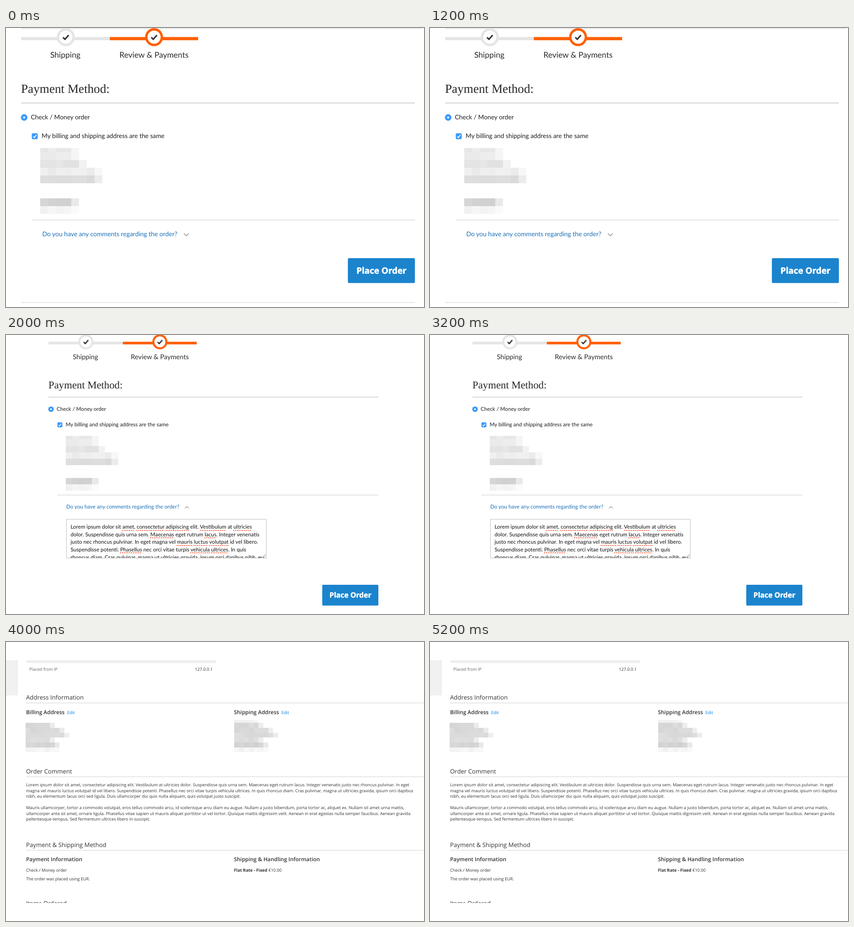
Write an HTML page that moves like this. It is 916 px wide and 611 px high and loops after 6000 ms.

```html
<!DOCTYPE html>
<html lang="en">
<head>
<meta charset="utf-8">
<title>Order comment</title>
<style>
  html, body { margin: 0; width: 100%; height: 100%; overflow: hidden; background: #fff; }
  svg { position: absolute; left: 0; top: 0; text-rendering: geometricPrecision; }
  #form { font: 13.8px Lato, sans-serif; fill: #1c1c1c; }
  #form .step { font-size: 17.5px; text-anchor: middle; fill: #2b2b2b; }
  #form .title { font: 27.2px "Liberation Serif", serif; fill: #262626; }
  #form .question { font-size: 13.95px; fill: #1a70b8; }
  #form .button { font: 700 18.9px "Open Sans", sans-serif; fill: #fff; stroke: #fff; stroke-width: .6; text-anchor: middle; }
  .mark { fill: none; stroke-linejoin: round; }
  #comment {
    position: absolute; left: 131.5px; top: 403px; width: 439px; height: 86px;
    box-sizing: border-box; padding: 8px 9px; border: 1px solid #bdbdbd; overflow: hidden;
    font: 11.72px/16.65px Lato, sans-serif; color: #111; white-space: pre;
    text-rendering: geometricPrecision;
  }
  #comment u { text-decoration: underline dotted #f4502a 2px; text-underline-offset: 3px; text-decoration-skip-ink: none; }
  #comment svg { left: auto; top: auto; right: 0; bottom: 0; }
  #order { font: 9.24px "Open Sans", sans-serif; fill: #333; }
  #order .head { font-size: 13.2px; }
  #order .sub { font-size: 11.9px; font-weight: 600; }
  #order .link { font-size: 9.5px; fill: #007bdb; }
</style>
</head>
<body>
<svg width="916" height="611" viewBox="0 0 916 611">
  <defs>
    <linearGradient id="shade" x2="0" y2="1">
      <stop stop-color="#dedede"/><stop offset="1" stop-color="#fff"/>
    </linearGradient>
    <clipPath id="page"><rect width="911" height="611"/></clipPath>
    <clipPath id="fold"><rect width="916" height="571.5"/></clipPath>
  </defs>

  <g id="checkout" clip-path="url(#page)">
    <g id="form">
      <rect x="33" width="893" height="3" fill="url(#shade)"/>
      <path d="M33 23.2H227.5" stroke="#e5e5e5" stroke-width="7"/>
      <path d="M227.5 23.2H421" stroke="#ff5f05" stroke-width="7"/>
      <g id="steps"></g>
      <text class="step" x="130" y="65">Shipping</text>
      <text class="step" x="324.3" y="65">Review &amp; Payments</text>
      <text class="title" x="33" y="142">Payment Method:</text>
      <path d="M33 164.4H896" stroke="#ccc" stroke-width="1.8"/>
      <circle cx="39.8" cy="196" r="7.2" fill="#3b99fc"/>
      <circle cx="39.8" cy="196" r="2.2" fill="#fff"/>
      <text x="54.5" y="200">Check / Money order</text>
      <rect x="56.5" y="230.5" width="13" height="13" rx="3" fill="#3b99fc"/>
      <path class="mark" d="M59.7 237.4l2.6 2.8 4.3-6.4" stroke="#fff" stroke-width="1.8"/>
      <text x="78" y="241.3">My billing and shipping address are the same</text>
      <g id="blur"></g>
      <path d="M56.5 420.5H896" stroke="#ccc" stroke-width="1.2"/>
      <text class="question" x="79.5" y="455.8">Do you have any comments regarding the order?</text>
      <path id="chevron" class="mark" d="M390 450l5.2 5.2 5.2-5.2" stroke="#888" stroke-width="1.3"/>
      <g id="footer">
        <rect x="749.2" y="504" width="146.8" height="54.5" rx="2.5" fill="#1b84cd"/>
        <text class="button" x="822.8" y="537.7">Place Order</text>
        <path d="M33 601.2H896" stroke="#ddd" stroke-width="1.4"/>
      </g>
    </g>
  </g>

  <g id="order">
    <path d="M0 40H25.5V117H0z" fill="#f1f1f1"/>
    <path d="M25 40V117" stroke="#e4e4e4"/>
    <path d="M44.5 40H460V46H44.5z" fill="#efefef"/>
    <text x="51" y="62.5" fill="#666">Placed from IP</text>
    <text x="414" y="62.5">127.0.0.1</text>
    <path d="M44 133.5H915M44 295H915M44 456H915" stroke="#d0d0d0"/>
    <text class="head" x="44" y="126.2">Address Information</text>
    <text class="sub" x="44" y="157.6">Billing Address</text>
    <text class="link" x="134" y="157.6">Edit</text>
    <text class="sub" x="499.5" y="157.6">Shipping Address</text>
    <text class="link" x="603.5" y="157.6">Edit</text>
    <g id="addresses"></g>
    <text class="head" x="44" y="287.8">Order Comment</text>
    <g id="paragraphs"></g>
    <text class="head" x="44" y="448.6">Payment &amp; Shipping Method</text>
    <text class="sub" x="44" y="479.8">Payment Information</text>
    <text x="44" y="502.8">Check / Money order</text>
    <text x="44" y="522">The order was placed using EUR.</text>
    <text class="sub" x="499.5" y="479.8">Shipping &amp; Handling Information</text>
    <text x="499.5" y="502.8"><tspan font-weight="700">Flat Rate - Fixed</tspan> €10.00</text>
    <g clip-path="url(#fold)"><text class="head" x="44" y="577.2">Items Ordered</text></g>
  </g>
</svg>

<div id="comment">Lorem ipsum dolor sit <u>amet</u>, <u>consectetur</u> <u>adipiscing</u> elit. <u>Vestibulum</u> at <u>ultricies</u>
dolor. Suspendisse quis urna sem. <u>Maecenas</u> eget rutrum <u>lacus</u>. Integer venenatis
justo nec rhoncus pulvinar. In eget magna vel <u>mauris</u> <u>luctus</u> <u>volutpat</u> id vel libero.
Suspendisse potenti. <u>Phasellus</u> nec orci vitae turpis <u>vehicula</u> <u>ultrices</u>. In quis
rhoncus diam. Cras pulvinar, magna ut ultricies gravida, ipsum orci dapibus nibh, eu<svg width="9" height="9"><path d="M1 8L8 1M5 8L8 5" stroke="#777"/></svg></div>

<script>
const $ = id => document.getElementById(id);

const step = (x, color) => `
  <circle cx="${x}" cy="20" r="17" fill="#fff" stroke="${color}" stroke-width="5.3"/>
  <path class="mark" d="M${x - 6} 20.5l4.3 4.3 8-9.3" stroke="#333" stroke-width="3.2"/>`;
$('steps').innerHTML = step(131, '#e5e5e5') + step(324.5, '#ff5f05');

let seed = 7;
const random = () => (seed = seed * 16807 % 2147483647) / 2147483647;

// Blurred-out text: each row is [cells, grey]; the first row may be cut to `head` height
function mosaic(left, top, cell, head, rows) {
  let out = '', y = top;
  rows.forEach(([cells, grey], row) => {
    const height = row ? cell : head;
    for (let i = 0; i < cells; i++) {
      const tone = grey + random() * 8 - 4;
      const g = Math.round(i === cells - 1 ? (tone + 255) / 2 : tone);
      out += `<rect x="${left + i * cell}" y="${y}" width="${cell}" height="${height}" fill="rgb(${g},${g},${g})" shape-rendering="crispEdges"/>`;
    }
    y += height;
  });
  return out;
}

$('blur').innerHTML =
  mosaic(74.5, 263, 17.1, 9, [[5, 233], [5, 235], [6, 227], [8, 238], [8, 219]]) +
  mosaic(74.5, 373, 17.1, 17, [[5, 211], [5, 243]]);

const address = [[6, 217], [8, 217], [9, 220], [6, 220], [7, 212], [7, 244]];
$('addresses').innerHTML = [42.7, 500].map(x => mosaic(x, 177, 10.65, 11, address)).join('') +
  mosaic(500, 171, 10.65, 6, [[5, 241]]);

$('paragraphs').innerHTML = [
  'Lorem ipsum dolor sit amet, consectetur adipiscing elit. Vestibulum at ultricies dolor. Suspendisse quis urna sem. Maecenas eget rutrum lacus. Integer venenatis justo nec rhoncus pulvinar. In eget',
  'magna vel mauris luctus volutpat id vel libero. Suspendisse potenti. Phasellus nec orci vitae turpis vehicula ultrices. In quis rhoncus diam. Cras pulvinar, magna ut ultricies gravida, ipsum orci dapibus',
  'nibh, eu elementum lacus orci sed ligula. Duis ullamcorper dui quis nulla aliquam, quis volutpat justo suscipit.',
  '',
  'Mauris ullamcorper, tortor a commodo volutpat, eros tellus commodo arcu, id scelerisque arcu diam eu augue. Nullam a justo bibendum, porta tortor ac, aliquet ex. Nullam sit amet urna mattis,',
  'ullamcorper ante sit amet, ornare ligula. Phasellus vitae sapien ut mauris aliquet porttitor ut vel tortor. Quisque mattis dignissim velit. Aenean in erat egestas nulla semper faucibus. Aenean gravida',
  'pellentesque tempus. Sed fermentum ultrices libero in suscipit.'
].map((line, i) => `<text x="44" y="${316.2 + i * 12.53}">${line}</text>`).join('');

const show = (id, on) => $(id).style.display = on ? '' : 'none';
const move = (id, transform) => $(id).setAttribute('transform', transform);

function render() {
  const scene = Math.floor(performance.now() % 6000 / 2000);
  const open = scene === 1;
  show('checkout', scene < 2);
  show('order', scene === 2);
  show('comment', open);
  move('form', open ? 'translate(65.35 -1.8) scale(.8378)' : '');
  move('blur', open ? 'translate(3.9 2.5)' : '');
  move('footer', open ? 'translate(0 151)' : '');
  move('chevron', open ? 'rotate(180 395.2 452.7)' : '');
  requestAnimationFrame(render);
}
render();
</script>
</body>
</html>
```
